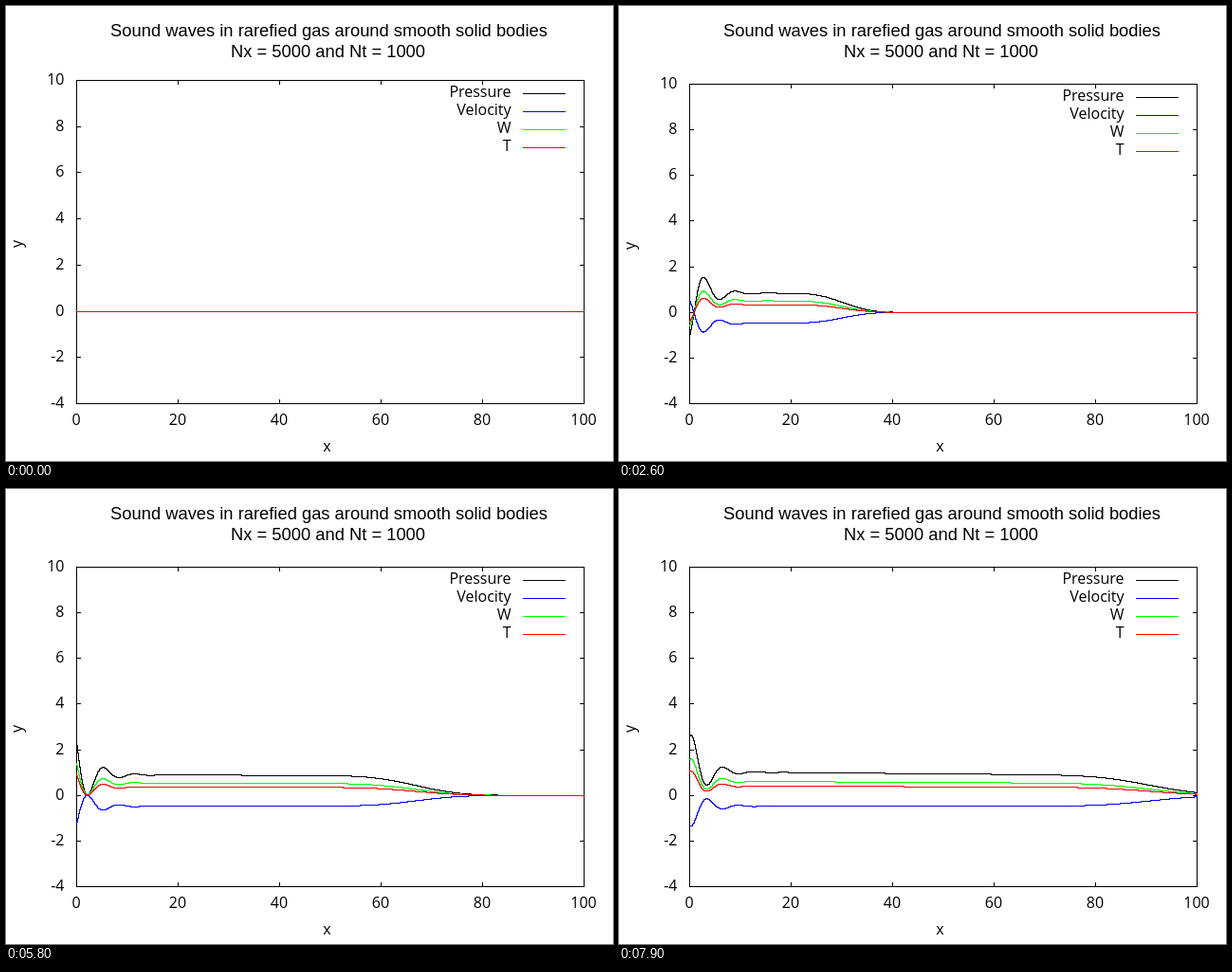
Animation, 640 px wide and 480 px high, one loop 8 s. Source, as an HTML page with a canvas:

```html
<!DOCTYPE html>
<html lang="en">
<head>
<meta charset="utf-8">
<title>Sound waves</title>
<style>
html, body { margin: 0; width: 100%; height: 100%; overflow: hidden; background: #fff; }
canvas { display: block; width: 640px; height: 480px; }
</style>
</head>
<body>
<canvas id="plot" width="640" height="480"></canvas>
<script>
const ctx = document.getElementById('plot').getContext('2d');
const STEP = 100, STEPS = 80;
const LEFT = 74, RIGHT = 609, BOTTOM = 419;
const SMALL = '16px "Open Sans", "Noto Sans", sans-serif';
const LARGE = '18.35px "Liberation Sans", Arial, sans-serif';

// plateau and wave shares of each quantity, relative to pressure
const SERIES = [
  { name: 'Pressure', color: '#000', wave: 1 },
  { name: 'Velocity', color: '#00f', wave: -0.54, flat: -0.475 },
  { name: 'W', color: '#0f0', wave: 0.6 },
  { name: 'T', color: '#f00', wave: 0.4 }
];

function erfc(z) {
  const a = Math.abs(z), t = 1 / (1 + 0.47047 * a);
  const tail = t * (0.3480242 + t * (-0.0958798 + t * 0.7478556)) * Math.exp(-a * a);
  return z < 0 ? 2 - tail : tail;
}

// spreading front, slowly rising plateau, damped wave from the wall
function value(s, x, n) {
  if (n === 0) return 0;
  const center = 1.147 * n + 0.4;
  const width = Math.max(0.4, 1.5 * Math.sqrt(n) - 1.63);
  const front = erfc((x - center) / width) / 2;
  const rise = (0.24 * (n / 80) ** 3 - 0.05) * Math.max(0, 1 - x / center);
  const flat = s.flat ?? s.wave * (0.86 + rise);
  const phase = 2 * Math.PI * n / 5 + 1.83;
  const wave = 1.84 * Math.exp(-x / 3.1) * Math.cos(1.013 * x - phase);
  return front * (flat + s.wave * wave);
}

function rect(color, x, y, w, h) {
  ctx.fillStyle = color;
  ctx.fillRect(x, y, w, h);
}

function text(str, x, y, align, font = SMALL) {
  ctx.fillStyle = '#000';
  ctx.font = font;
  ctx.textAlign = align;
  ctx.fillText(str, x, y);
}

function drawAxes(top, rowOf) {
  for (let v = -4; v <= 10; v += 2) {
    const y = rowOf(v);
    rect('#000', LEFT, y, 5, 1);
    rect('#000', RIGHT - 4, y, 5, 1);
    text(String(v), 61.5, y + 5, 'right');
  }
  for (let v = 0; v <= 100; v += 20) {
    const x = LEFT + Math.round(v * 5.35);
    rect('#000', x, top, 1, 5);
    rect('#000', x, BOTTOM - 4, 1, 5);
    text(String(v), x, 442, 'center');
  }
  rect('#000', LEFT, top, RIGHT - LEFT + 1, 1);
  rect('#000', LEFT, BOTTOM, RIGHT - LEFT + 1, 1);
  rect('#000', LEFT, top, 1, BOTTOM - top + 1);
  rect('#000', RIGHT, top, 1, BOTTOM - top + 1);
}

function drawLabels(top) {
  text('Sound waves in rarefied gas around smooth solid bodies', 340.5, 32, 'center', LARGE);
  text('Nx = 5000 and Nt = 1000', 339.5, 54, 'center', LARGE);
  text('x', 338.5, 470, 'center');
  ctx.save();
  ctx.translate(17, Math.round((top + BOTTOM) / 2) + 2);
  ctx.rotate(-Math.PI / 2);
  text('y', 0, 0, 'center');
  ctx.restore();
}

function drawCurve(s, n, rowOf) {
  const rowAt = px => {
    const x = Math.min(100, Math.max(0, (px - LEFT) / 5.35));
    return rowOf(value(s, x, n));
  };
  for (let px = LEFT; px <= RIGHT; px++) {
    const a = rowAt(px - 0.5), b = rowAt(px + 0.5);
    rect(s.color, px, Math.min(a, b), 1, Math.abs(a - b) + 1);
  }
}

function draw(n) {
  const top = n === 0 ? 78 : 82;
  const rowOf = v => Math.round(BOTTOM - (v + 4) * (BOTTOM - top) / 14);
  rect('#fff', 0, 0, 640, 480);
  drawAxes(top, rowOf);
  drawLabels(top);
  SERIES.forEach((s, i) => {
    const y = top + 14 + 19 * i;
    text(s.name, 532.5, y + 4, 'right');
    rect(s.color, 545, y, 45, 1);
    drawCurve(s, n, rowOf);
  });
}

const start = performance.now();
let shown = -1;
function tick() {
  const n = Math.floor((performance.now() - start) / STEP) % STEPS;
  if (n !== shown) draw(shown = n);
  requestAnimationFrame(tick);
}
draw(0);
tick();
</script>
</body>
</html>
```
